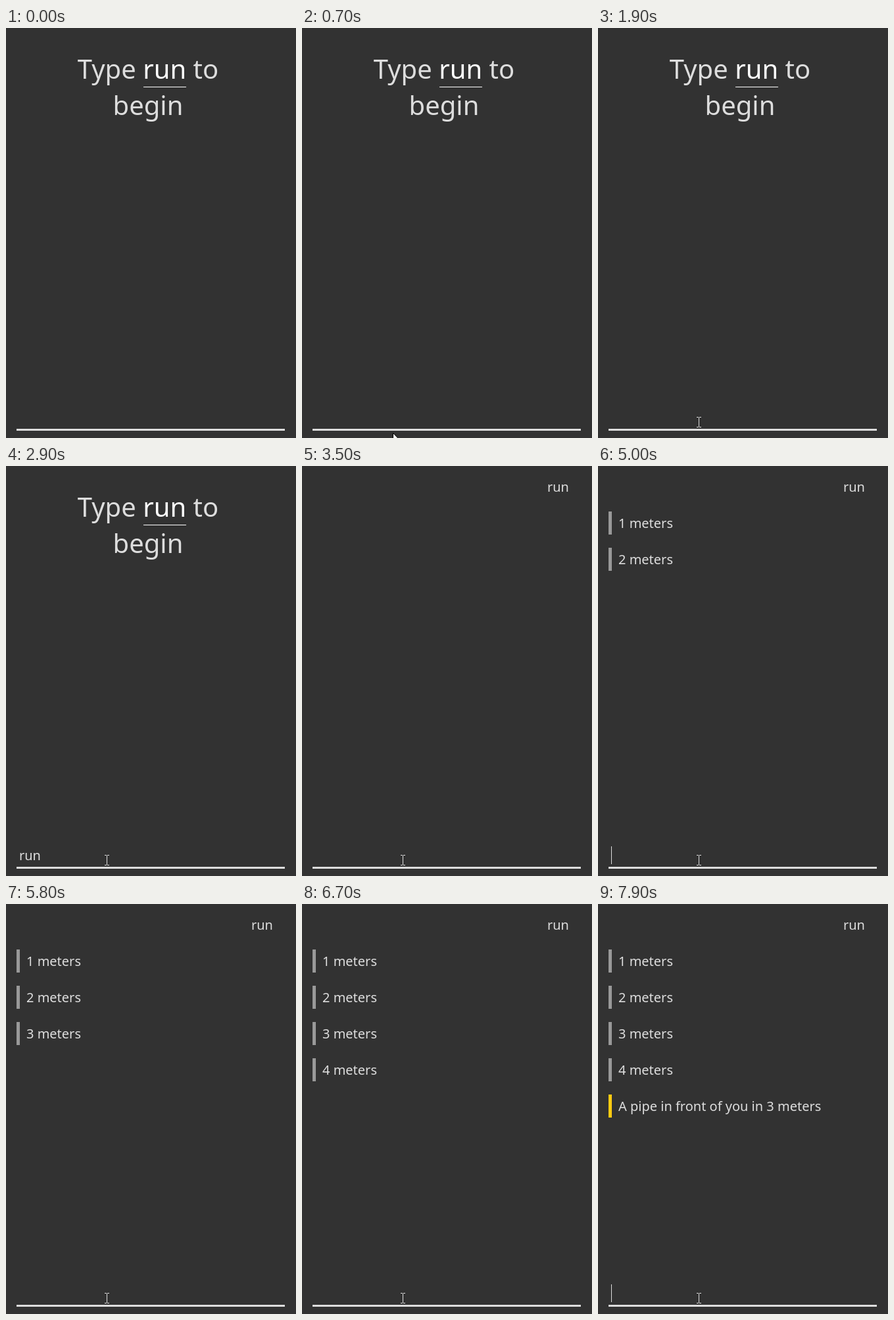
Write an HTML page that moves like this. It is 441 by 622 pixels and loops after 8000 ms.

```html
<!DOCTYPE html>
<html lang="en">
<head>
<meta charset="utf-8">
<title>Type run to begin</title>
<style>
  html, body { margin: 0; width: 100%; height: 100%; overflow: hidden; background: #323232; }
  svg { display: block; }
  text { font: 20px "Noto Sans", "Open Sans", sans-serif; fill: #ddd; white-space: pre; }
  #title text { font-size: 40px; text-anchor: middle; }
  #title tspan { fill: #fff; }
</style>
</head>
<body>
<svg id="stage" width="441" height="622" viewBox="0 0 441 622">
  <g id="title">
    <text x="216" y="77">Type <tspan>run</tspan> to</text>
    <text x="216" y="132">begin</text>
    <rect x="209" y="89" width="65" height="1" fill="#fff"/>
  </g>
  <text id="command" x="373" y="39">run</text>
  <g id="log"></g>
  <text id="typed" x="20" y="598"></text>
  <rect id="caret" y="577" width="1" height="27" fill="#ddd"/>
  <rect x="16" y="608" width="408" height="3" fill="#ddd"/>
  <path id="arrow" d="M.5 .5V16.5L4.2 13L6.7 18.5L9 17.5L6.6 12H11.5Z" fill="#fff" stroke="#000"/>
  <path id="beam" d="M-3 -7.5H0M1 -7.5H4M.5 -7V7M-3 7.5H0M1 7.5H4" fill="none" stroke="#ddd"/>
</svg>
<script>
const LOOP = 8000;
const SUBMIT = 3000;
const el = id => document.getElementById(id);
const show = (node, on) => node.setAttribute("visibility", on ? "visible" : "hidden");

const messages = [
  [3900, "1 meters"],
  [4800, "2 meters"],
  [5800, "3 meters"],
  [6700, "4 meters"],
  [7600, "A pipe in front of you in 3 meters", "#fc1"]
];
el("log").innerHTML = messages.map(([, label, color = "#999"], i) => {
  const y = 69 + 55 * i;
  return `<g><rect x="16" y="${y}" width="5" height="35" fill="${color}"/>` +
    `<text x="31" y="${y + 25}">${label}</text></g>`;
}).join("");
const rows = [...el("log").children];

// Pointer positions, one per 100 ms starting at 100 ms
const path = [[423, 94], [385, 190], [320, 330], [235, 475], [160, 585],
              [128, 618], [138, 614], [149, 602], [153, 598]];
// Times at which the caret switches on and off
const blinks = [1500, 1900, 2300, 2900, 3000, 3500, 4000, 4500,
                5000, 5400, 5900, 6400, 6900, 7400, 7900];

function drawPointer(t) {
  const step = Math.min(Math.floor(t / 100), path.length) - 1;
  const [x, y] = path[Math.max(step, 0)];
  const inInput = y > 572 && y < 608;
  for (const [id, on] of [["arrow", !inInput], ["beam", inInput]]) {
    el(id).setAttribute("transform", `translate(${x} ${y})`);
    show(el(id), step >= 0 && on);
  }
}

function draw(t) {
  const submitted = t >= SUBMIT;
  show(el("title"), !submitted);
  show(el("command"), submitted);
  rows.forEach((row, i) => show(row, t >= messages[i][0]));

  const count = submitted || t < 2300 ? 0 : Math.min(3, Math.floor((t - 2200) / 100));
  el("typed").textContent = "run".slice(0, count);
  el("caret").setAttribute("x", [20, 28, 40, 53][count]);
  show(el("caret"), blinks.filter(b => b <= t).length % 2 === 1);
  drawPointer(t);
}

const start = performance.now();
function tick() {
  draw((performance.now() - start) % LOOP);
  requestAnimationFrame(tick);
}
tick();
</script>
</body>
</html>
```
